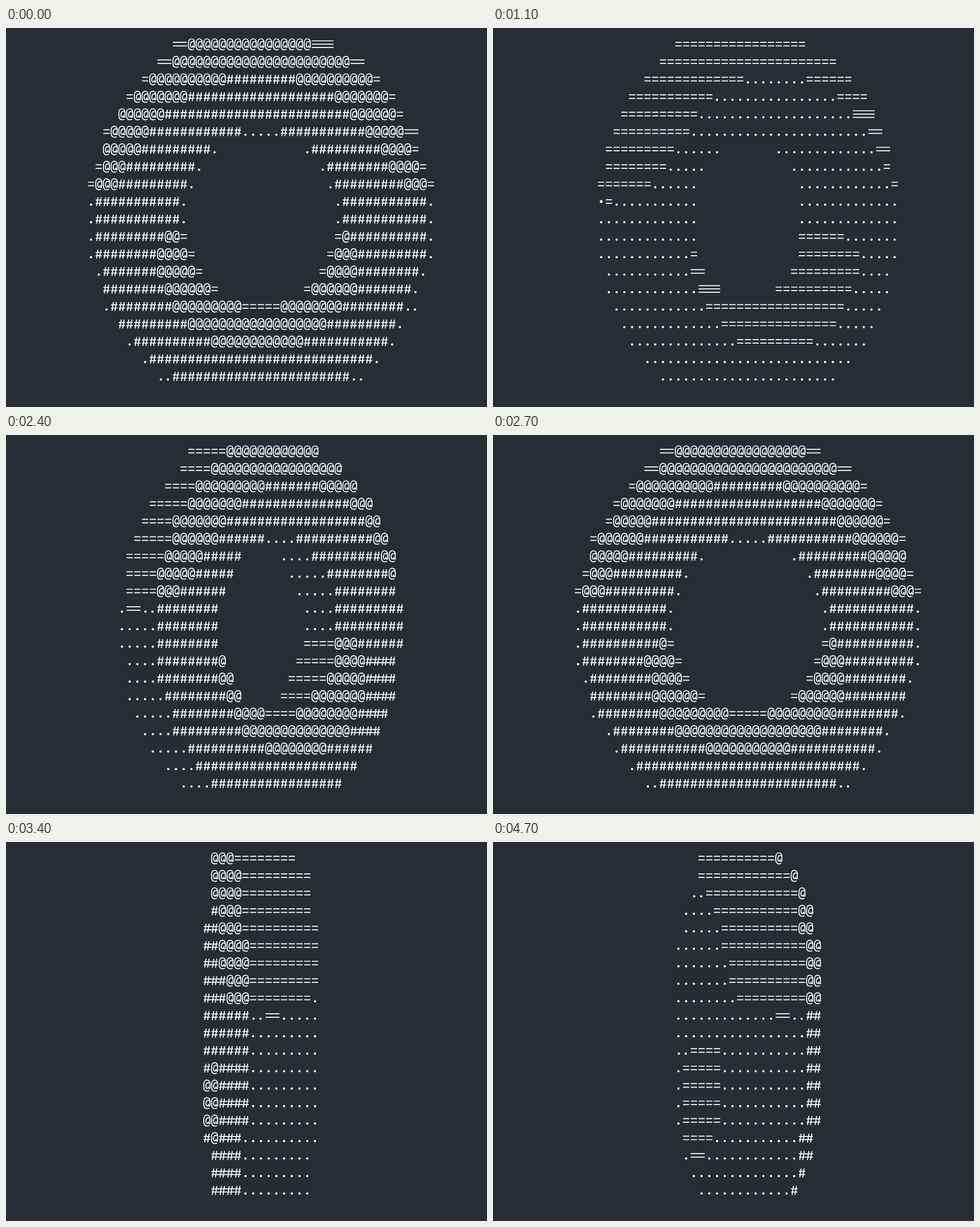
Recreate the animation shown at these times as an HTML page with a canvas. Size 844x664 px, loop 4900 ms.

```html
<!DOCTYPE html>
<html lang="en">
<head>
<meta charset="utf-8">
<title>Rotating character ring</title>
<style>
  html, body { margin: 0; width: 100%; height: 100%; overflow: hidden; background: #282c33; }
  canvas { display: block; }
</style>
</head>
<body>
<canvas id="stage" width="844" height="664" role="img" aria-label="Ring of characters turning"></canvas>
<script>
const ctx = document.getElementById('stage').getContext('2d');
const LOOP = 4900, TICK = 100;
const HOLDS = [1, 17, 30, 45, 48]; // ticks that repeat the previous picture
const ROWS = 20, REACH = 23;
const CELL = 13.55, LINE = 30.63, MID_X = 447.3, TOP = 28.3;
const RING = 15.95, TUBE = 6.45;
const START = 0.039, STEP = 0.25;

// Character of the torus surface under one cell; x and y in cell widths.
function shade(x, y, cos, sin) {
  let w = REACH;
  for (let i = 0; i < 120 && w > -REACH; i++) {
    const ox = x * cos + w * sin;
    const oz = w * cos - x * sin;
    const rho = Math.hypot(ox, y);
    const d = Math.hypot(rho - RING, oz) - TUBE;
    if (d < 0.002) {
      const nz = oz / TUBE;
      const ny = (rho - RING) / TUBE * y / rho;
      const up = ny > 0.088 + 0.022 * nz * nz;
      return nz > 0.4935 ? (up ? '@' : '#') : (up ? '=' : '.');
    }
    w -= d;
  }
  return ' ';
}

function render(angle) {
  const cos = Math.cos(angle), sin = Math.sin(angle);
  return Array.from({ length: ROWS }, (_, r) => {
    let line = '';
    for (let c = -REACH; c <= REACH; c++) line += shade(c, 2 * (10 - r), cos, sin);
    return line;
  });
}

function segment(x1, y1, x2, y2) {
  ctx.moveTo(x1, y1);
  ctx.lineTo(x2, y2);
}

function dot(x, y, radius) {
  ctx.beginPath();
  ctx.arc(x, y, radius, 0, 2 * Math.PI);
  ctx.fill();
}

function at(x, y) {
  ctx.moveTo(x + 4.3, y + 9);
  ctx.bezierCurveTo(x + 1, y + 10.6, x - 5.3, y + 11, x - 5.3, y + 3);
  ctx.lineTo(x - 5.3, y - 2.5);
  ctx.bezierCurveTo(x - 5.3, y - 11.4, x + 5.3, y - 11.4, x + 5.3, y - 3.5);
  ctx.lineTo(x + 5.3, y + 5.3);
  ctx.bezierCurveTo(x + 3, y + 6, x + 2.6, y + 4, x + 2.6, y + 2);
  ctx.moveTo(x + 5.3, y - 4);
  ctx.bezierCurveTo(x - 0.5, y - 6, x - 1.8, y - 2, x - 1.8, y + 1);
  ctx.bezierCurveTo(x - 1.8, y + 7, x + 2.4, y + 6, x + 2.6, y + 2);
}

// Horizontal bars, joined into one when the run forms a ligature.
function bars(x, y, count, joined, offsets) {
  const last = x + (count - 1) * CELL;
  for (const dy of offsets) {
    if (joined) segment(x - 5.5, y + dy, last + 5.5, y + dy);
    else for (let i = 0; i < count; i++) {
      segment(x + i * CELL - 5.5, y + dy, x + i * CELL + 5.5, y + dy);
    }
  }
}

function drawRun(ch, count, x, y, next) {
  if (ch === '.') {
    const raised = count === 1 && next === '=';
    const tight = count === 2 || count === 3;
    const gap = tight ? 12.3 : CELL;
    const first = x + (count - 1) * (CELL - gap) / 2;
    for (let i = 0; i < count; i++) {
      dot(first + i * gap, raised ? y : y + 5.6, raised ? 2.5 : 2);
    }
    return;
  }
  ctx.beginPath();
  if (ch === '=') {
    bars(x, y, count, count === 2 || count === 3, count === 3 ? [-5.8, 0, 5.8] : [-3.1, 3.1]);
  } else if (ch === '#') {
    bars(x, y, count, count > 1 && count < 5, [-2.6, 3]);
    for (let i = 0; i < count; i++) {
      const cx = x + i * CELL;
      segment(cx - 3.9, y + 8, cx - 1.4, y - 7.6);
      segment(cx + 1.4, y + 8, cx + 3.9, y - 7.6);
    }
  } else {
    for (let i = 0; i < count; i++) at(x + i * CELL, y);
  }
  ctx.stroke();
}

function draw(lines) {
  ctx.fillStyle = '#282c33';
  ctx.fillRect(0, 0, 844, 664);
  ctx.fillStyle = ctx.strokeStyle = '#fff';
  ctx.lineWidth = 1.7;
  lines.forEach((line, r) => {
    const shift = r === 0 ? 1 : 0; // the first line lacks the leading blank
    const runs = [...line.matchAll(/([.=#@])\1*/g)];
    runs.forEach(({ 0: run, index }, i) => {
      const end = index + run.length;
      const after = runs[i + 1];
      const next = after && after.index === end && after[0].length === 1 ? after[0] : '';
      drawRun(run[0], run.length, MID_X + (index - REACH - shift) * CELL, TOP + r * LINE, next);
    });
  });
}

let shown = -1;
function tick() {
  const t = Math.floor(performance.now() % LOOP / TICK);
  const n = t - HOLDS.filter(h => h <= t).length;
  if (n !== shown) {
    shown = n;
    draw(render(START + n * STEP));
  }
  requestAnimationFrame(tick);
}
tick();
</script>
</body>
</html>
```
